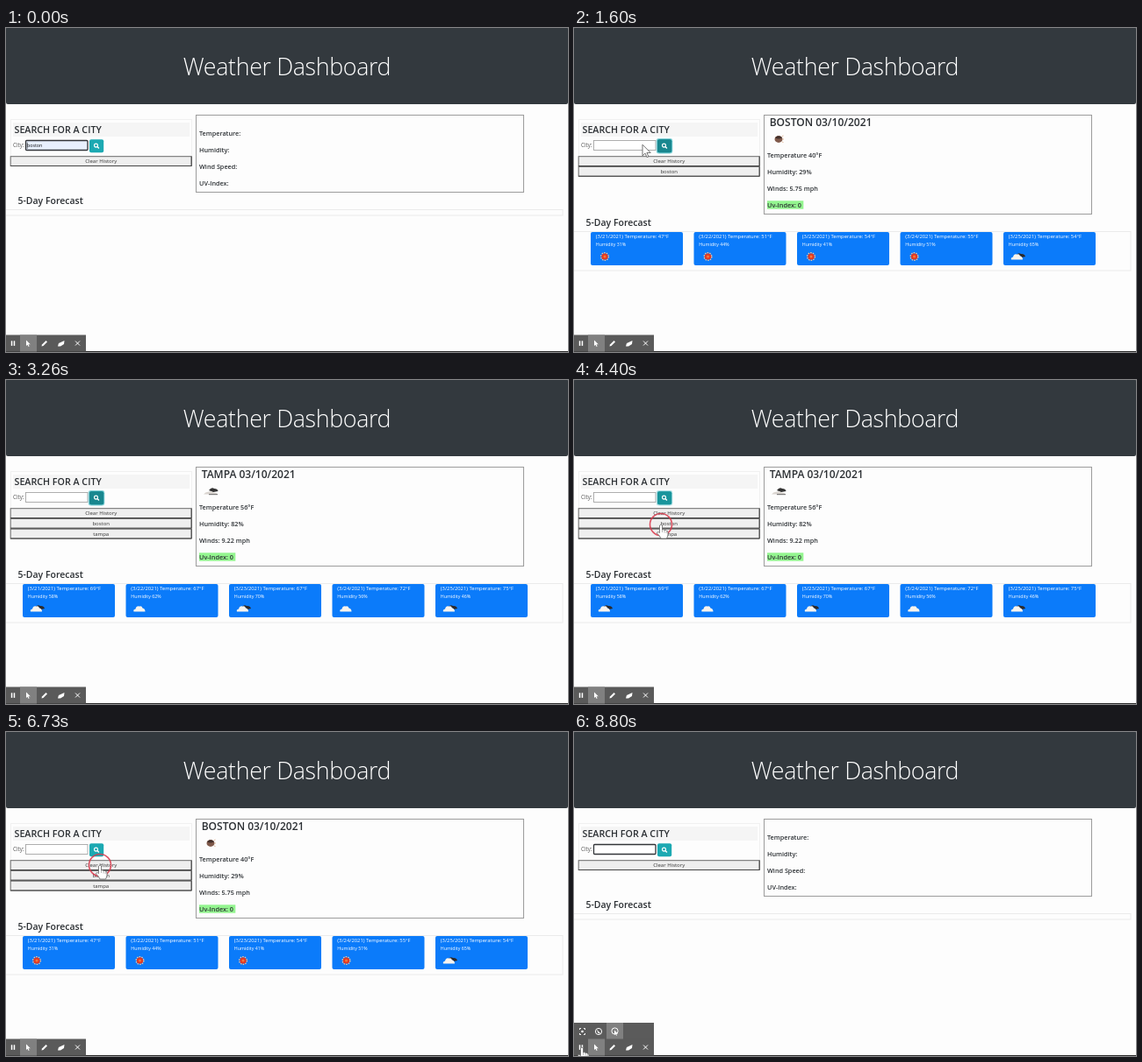
Recreate the animation shown at these times as an HTML page. Size 640 by 370 pixels, loop 8930 ms.

```html
<!DOCTYPE html>
<html lang="en">
<head>
<meta charset="utf-8">
<title>Weather Dashboard</title>
<style>
  html, body { margin: 0; width: 100%; height: 100%; overflow: hidden; background: #fdfdfd; }
  svg { display: block; width: 640px; height: 370px; font-family: "Open Sans", "Noto Sans", sans-serif; }
</style>
</head>
<body>
<svg id="stage" viewBox="0 0 640 370">
  <rect width="640" height="370" fill="#fdfdfd"/>
  <rect y="-1" width="640" height="88" rx="2" fill="#33393e"/>
  <text x="320" y="53.500" text-anchor="middle" font-size="26.800" font-weight="300" letter-spacing="-.35" fill="#fff">Weather Dashboard</text>
  <rect x="5.500" y="104.500" width="206" height="53" fill="none" stroke="#f1f1f1"/>
  <rect x="8" y="108" width="201" height="16" fill="#f5f5f5"/>
  <text x="9.500" y="120.300" font-size="10.700" font-weight="600" fill="#2b2f33">SEARCH FOR A CITY</text>
  <text x="8" y="136.300" font-size="6.200" fill="#555">City:</text>
  <g id="view"></g>
  <rect y="369" width="640" height="1" fill="#2a2a2a"/>
  <g id="tools"></g>
  <g id="pointer"></g>
</svg>
<script>
const LOOP = 8930, STEP = LOOP / 134;
const $ = id => document.getElementById(id);

const cities = {
  boston: { temp: 40, hum: 29, wind: 5.75, icon: 'moon',
    days: [[47, 31, 'sun'], [51, 44, 'sun'], [54, 41, 'sun'], [55, 51, 'sun'], [54, 65, 'broken']] },
  tampa: { temp: 56, hum: 82, wind: 9.22, icon: 'night',
    days: [[69, 58, 'broken'], [67, 62, 'cloud'], [67, 70, 'broken'], [72, 56, 'cloud'], [75, 46, 'broken']] }
};

// Values hold from their start time until the next one
const track = {
  city: [[0, ''], [800, 'boston'], [2860, 'tampa'], [4450, 'boston'], [7000, '']],
  forecast: [[0, ''], [1190, 'boston'], [2990, 'tampa'], [4520, 'boston'], [7000, '']],
  history: [[0, 0], [800, 1], [2860, 2], [7000, 0]],
  value: [[0, 'boston'], [800, ''], [1860, 't'], [2190, 'tampa'], [2860, '']],
  focus: [[0, 1], [530, 0], [1600, 1], [2720, 0], [7190, 1]],
  cursor: [[0, ''], [60, 'hand'], [930, ''], [1520, 'arrow'], [1660, 'beam'], [2060, ''], [2190, 'hand'],
    [3060, ''], [3520, 'hand'], [4590, ''], [4790, 'hand'], [7000, 'arrow'], [8400, 'hand']]
};
const at = (name, t) => track[name].filter(k => k[0] <= t).pop()[1];

// Pointer hot spot: time, x, y
const route = [[0, 90, 154], [200, 90, 154], [500, 102, 132], [1520, 102, 132], [1660, 62, 134], [2190, 66, 138],
  [2330, 90, 151], [2430, 90, 152], [2700, 102, 132], [3520, 102, 132], [4200, 99, 165], [4790, 99, 165],
  [5400, 102, 130], [5990, 102, 130], [6520, 107, 152], [7000, 107, 152], [7190, 66, 134], [7390, 105, 142],
  [7790, 105, 142], [8590, 9, 360], [8930, 9, 360]];
const clicks = [530, 1600, 2400, 2720, 4330, 6660, 7190];

function locate(t) {
  const i = Math.max(1, route.findIndex(k => k[0] >= t));
  const [t0, x0, y0] = route[i - 1], [t1, x1, y1] = route[i];
  const p = (t - t0) / (t1 - t0), e = p * p * (3 - 2 * p);
  return [x0 + (x1 - x0) * e, y0 + (y1 - y0) * e];
}

const ramp = (t, from, to) =>
  Math.max(0, Math.min(1, (t - from) / 150, 1 - (t - to) / 150));

const rect = (x, y, w, h, fill, more = '') =>
  `<rect x="${x}" y="${y}" width="${w}" height="${h}" fill="${fill}" ${more}/>`;
const text = (x, y, size, s, more = 'fill="#212529"') =>
  `<text x="${x}" y="${y}" font-size="${size}" ${more}>${s}</text>`;
const path = (d, more) => `<path d="${d}" ${more}/>`;
const put = (x, y, s) => `<g transform="translate(${x} ${y})">${s}</g>`;
const bold = 'font-weight="600" fill="#2b2f33"';

const puff = 'M-7 3.500Q-8 1 -5 .5Q-4 -3.500 -.5 -2.500Q2 -3.500 3 -.5Q6 0 6 3.500Z';
const shade = path('M-1 -2Q1 -5 4 -3Q8 -3.500 9 0L5 1Q3 -2 -1 -2Z', 'fill="#2c2a2b"');
const icons = {
  sun: '<circle r="4.300" fill="none" stroke="#f6c7a0" stroke-width="1.400" stroke-dasharray="1.500 1.200"/>' +
    '<circle r="3.600" fill="#e5381f"/><circle r="1.500" fill="#f47a3c"/>',
  cloud: path(puff, 'fill="#f7f3ee"'),
  broken: shade + path(puff, 'fill="#f7f3ee"'),
  moon: '<ellipse rx="4.500" ry="3.900" fill="#805a4b"/>' +
    path('M-4 -1.500Q0 -6 4 -1.500Q0 .5 -4 -1.500Z', 'fill="#43302b"') +
    path('M4 -3.500L5.500 -4M4.500 0H6M4 3L5.500 3.600', 'stroke="#dba77f" stroke-width=".8"'),
  night: path('M-2 -1Q1 -5 4 -3Q8 -3 8.500 0L3 1Z', 'fill="#333"') +
    path('M-8 3.500Q-6 1 -3 .8Q1 -.5 3 1.500Q7 1.500 8 3.500Z', 'fill="#d9d4cf"') +
    path('M-2 3.700H8', 'stroke="#444" stroke-width=".8"')
};

function searchForm(t) {
  const focus = at('focus', t), value = at('value', t);
  const glow = Math.max(ramp(t, 530, 1600), ramp(t, 2720, 4340));
  const dark = Math.max(glow, ramp(t, 450, 600), ramp(t, 2650, 2800), ramp(t, 5250, 5990));
  const filled = value.length > 1;
  let s = rect(22.5, 128.5, 70.5, 11, filled ? '#e8f0fe' : '#fff',
    focus ? 'rx="1" stroke="#333539" stroke-width="1.300"' : 'stroke="#a6a6a6" stroke-width=".9"');
  s += text(24, 136.2, 5.3, value, 'fill="#111"');
  const start = t >= 7190 ? 7190 : t >= 2190 ? 2190 : t >= 1600 ? 1600 : 0;
  if (focus && (t - start) % 1060 < 530) {
    const x = value === 'tampa' ? 41.2 : value === 't' ? 26.5 : 23.8;
    s += rect(x, 130.5, .6, 7.5, '#111');
  }
  s += rect(93.7, 126, 18.6, 17.5, '#3ab5c0', `rx="3" opacity="${glow * .6}"`);
  s += rect(95, 127.3, 16.2, 15, '#1ca9b2', 'rx="2"');
  s += rect(95, 127.3, 16.2, 15, '#19878f', `rx="2" opacity="${dark}"`);
  s += '<circle cx="102.500" cy="134.100" r="2" fill="none" stroke="#fff" stroke-width="1.100"/>';
  s += path('M104 135.600L105.900 137.500', 'stroke="#fff" stroke-width="1.400"');
  ['Clear History', 'boston', 'tampa'].slice(0, 1 + at('history', t)).forEach((label, i) => {
    const y = 146.7 + i * 11.75;
    s += rect(5.2, y, 206, 10.8, '#efefef', 'stroke="#686868"');
    s += path(`M5.200 ${y + 10.8}h206v-10.800`, 'fill="none" stroke="#444"');
    s += text(108.2, y + 7.6, 6, label, 'text-anchor="middle" fill="#333"');
  });
  return s;
}

function results(t) {
  const name = at('city', t), c = cities[name], uv = at('forecast', t);
  const top = c ? 148.3 : 123.3;
  let s = rect(216.5, 99.5, 373, c ? 113 : 88, 'none', 'stroke="#9c9c9c"');
  if (c) {
    s += text(222.7, 112.3, 12, name.toUpperCase() + ' 03/10/2021', bold);
    s += put(233, 127, icons[c.icon]);
  }
  if (uv) s += rect(220, 197.3, 41.3, 9.4, '#93f58f');
  const rows = c
    ? [`Temperature ${c.temp}°F`, `Humidity: ${c.hum}%`, `Winds: ${c.wind} mph`, uv ? 'Uv-Index: 0' : 'UV-Index:']
    : ['Temperature:', 'Humidity:', 'Wind Speed:', 'UV-Index:'];
  rows.forEach((row, i) => s += text(220, top + i * 18.75, 7.25, row, bold));
  return s;
}

function forecast(t) {
  const c = cities[at('forecast', t)], y = at('city', t) ? 25 : 0;
  let s = text(13.4, 200.7 + y, 10.5, '5-Day Forecast', bold);
  s += rect(-2, 207.5 + y, 636, c ? 44.5 : 6.5, 'none', 'stroke="#ebebeb"');
  if (c) c.days.forEach(([temp, hum, icon], i) => {
    const x = 19 + i * 117.5, white = 'fill="#fff"';
    s += rect(x, 233, 105, 38, '#0b7bfa', 'rx="2"');
    s += text(x + 5.8, 240, 5.87, `(3/${21 + i}/2021) Temperature: ${temp}°F`, white);
    s += text(x + 5.8, 249, 5.3, `Humidity ${hum}%`, white);
    s += put(x + 16, 261, icons[icon]);
  });
  return s;
}

const arrowShape = 'M0 0V11L2.600 8.600L4.400 12.500L6 11.800L4.300 8H8Z';
const handShape = 'M-1.500 1Q0 -1 1.500 1V6Q3 5 4 6.500Q5.500 5.800 6.300 7.300Q8 7 8 9V12Q7.500 14 6.500 16H0Q-1 13 -4.500 10Q-4.500 7.500 -1.500 9.500Z';

function toolbar(t) {
  const line = 'fill="none" stroke="#fff" stroke-width="1"';
  let s = '';
  if (t >= 8450) {
    s += rect(0, 332, 91, 19, '#5b5b5b') + rect(37, 332, 19, 19, '#808080');
    s += path('M6.500 340V338.500H8M11 338.500H12.500V340M12.500 344V345.500H11M8 345.500H6.500V344', line);
    s += '<circle cx="9.500" cy="342" r="1.300" fill="#fff"/>';
    s += `<circle cx="28" cy="342" r="3.600" ${line}/>` + path('M25.800 339.800L30.500 344.500L27.500 344Z', 'fill="#fff"');
    s += `<circle cx="46.500" cy="341.500" r="3.600" ${line}/>` + put(46, 340.5, path(arrowShape, 'fill="#fff" transform="scale(.5)"'));
  }
  s += rect(0, 350.5, 91, 19, '#5a5a5a') + rect(16, 350.5, 19, 19, '#808080');
  s += rect(5.8, 357.3, 1.5, 5.6, '#fff') + rect(8.7, 357.3, 1.5, 5.6, '#fff');
  s += put(23, 356.5, path(arrowShape, 'fill="#fff" transform="scale(.6)"'));
  s += path('M40.500 363.500L41 361.500L45.500 357L47 358.500L42.500 363Z', 'fill="#fff"');
  s += path('M59 363.500L60 360L66.500 357L66 361L62 363.500Z', 'fill="#fff"');
  s += path('M79 357.500L84 362.500M84 357.500L79 362.500', line);
  return s;
}

function pointer(t) {
  const kind = at('cursor', t), [x, y] = locate(t);
  const edge = 'fill="#fff" stroke="#666" stroke-width=".8" stroke-linejoin="round"';
  let s = '';
  if (kind === 'hand') {
    s = path(handShape, edge) + path('M1.500 6V9M4 7V9.500M6.200 8V10', 'stroke="#888" stroke-width=".6"');
  } else if (kind === 'arrow') {
    s = path(arrowShape, edge + ' transform="scale(1.150)"');
  } else if (kind === 'beam') {
    s = path('M-1.500 -4H1.500M0 -4V4M-1.500 4H1.500', 'stroke="#333" stroke-width=".8"');
  }
  if (clicks.some(c => t >= c && t < c + 200)) {
    s = '<circle r="12.500" fill="none" stroke="#d8374a" stroke-width="1.600" opacity=".85"/>' + s;
  }
  return put(x, y, s);
}

function draw(t) {
  $('view').innerHTML = searchForm(t) + results(t) + forecast(t);
  $('tools').innerHTML = toolbar(t);
  $('pointer').innerHTML = pointer(t);
}

let last = -1;
const begin = performance.now();
function tick() {
  const t = (performance.now() - begin) % LOOP;
  const step = Math.floor((t + 7) / STEP) % 134;
  if (step !== last) draw((last = step) * STEP);
  requestAnimationFrame(tick);
}
tick();
</script>
</body>
</html>
```
